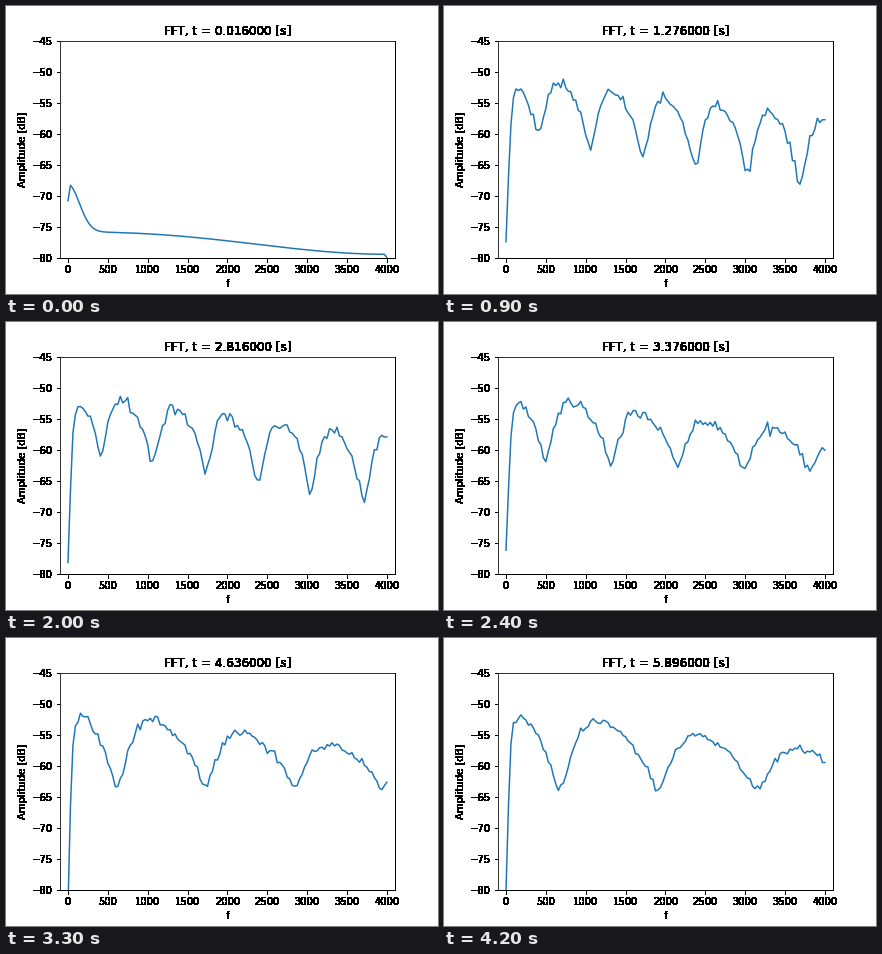
These frames come from a looping animation (432 px wide and 288 px high, 4300 ms). A matplotlib script:

```python
import numpy as np
import matplotlib.pyplot as plt
from matplotlib.animation import FuncAnimation

FRAMES = 43
STEP = 0.14
START = 0.016
RATE = 8000
CLOSEST = 2.04  # time of the longest echo delay, in seconds
FREQ = np.linspace(0, RATE / 2, 129)
KHZ = FREQ / 1000

plt.rcParams["text.kerning_factor"] = 6


def comb(phase, gain=0.6):
    """Comb filter response in dB, scaled to 0 at a notch and 1 at a peak."""
    skewed = phase + 0.05 * (1 - np.cos(2 * np.pi * phase))
    power = 1 + gain**2 - 2 * gain * np.cos(2 * np.pi * skewed)
    low, high = (1 - gain)**2, (1 + gain)**2
    return np.log(power / low) / np.log(high / low)


def quiet_spectrum():
    """Background hum with a gentle slope, before the sound sets in."""
    slope = -77.6 + 1.8 * np.cos(np.pi * (FREQ / FREQ[-1])**1.2)
    level = slope + 7.7 * np.exp(-(FREQ / 200)**2)
    level[0] -= 2.7
    level[-1] -= 0.5
    return level


def echo_spectrum(t, rng):
    """Noise with an echo whose delay rises and falls as the source passes."""
    near = 1 / (1 + ((t - CLOSEST) / 1.1)**2)
    delay = 5.7 + 9.6 * near  # in samples
    spacing = RATE / delay
    first = spacing * (0.53 + 0.014 * (delay - 6))

    # The lobe below the first notch peaks at 170 Hz and stays flat below it
    offset = FREQ - first
    first_lobe = np.maximum(offset / (2 * (first - 170)), -0.5)
    shape = comb(np.where(offset < 0, first_lobe, offset / spacing))

    peak = -50.7 - 1.8 * KHZ - 2 * near * (offset < 0)
    tilt = -2.4 * np.exp(-((near - 0.72) / 0.25)**2)
    notch = -64.3 + 7 * near + tilt * KHZ

    level = notch + (peak - notch) * shape
    level += rng.normal(0, 0.42, FREQ.size)
    level -= 40 * np.exp(-np.arange(FREQ.size))
    level[0] = rng.normal(-77, 3.5)
    return level


def spectrum(i):
    if i == 0:
        return quiet_spectrum()
    return echo_spectrum(START + STEP * i, np.random.default_rng(i))


def harden(image, dpi):
    """Make every touched pixel opaque, so edges outside the plot are crisp."""
    image = image.copy()
    image[..., 3] = image[..., 3] > 0
    return np.round(image * 255).astype(np.uint8), 0, 0


fig, ax = plt.subplots(figsize=(6, 4), dpi=72, facecolor="white")
fig.subplots_adjust(left=0.125, right=0.9, bottom=0.125, top=0.88)
ax.set_agg_filter(harden)
line, = ax.plot(FREQ, spectrum(0))
ax.set(xlim=(-100, 4100), ylim=(-80, -45), xlabel="f", ylabel="Amplitude [dB]")
ax.set_xticks(range(0, 4001, 500))
ax.set_yticks(range(-80, -44, 5))


def update(i):
    line.set_ydata(spectrum(i))
    ax.set_title(f"FFT, t = {START + STEP * i:.6f} [s]")
    return line,


anim = FuncAnimation(fig, update, frames=FRAMES, interval=100, repeat=True)
plt.show()
```
